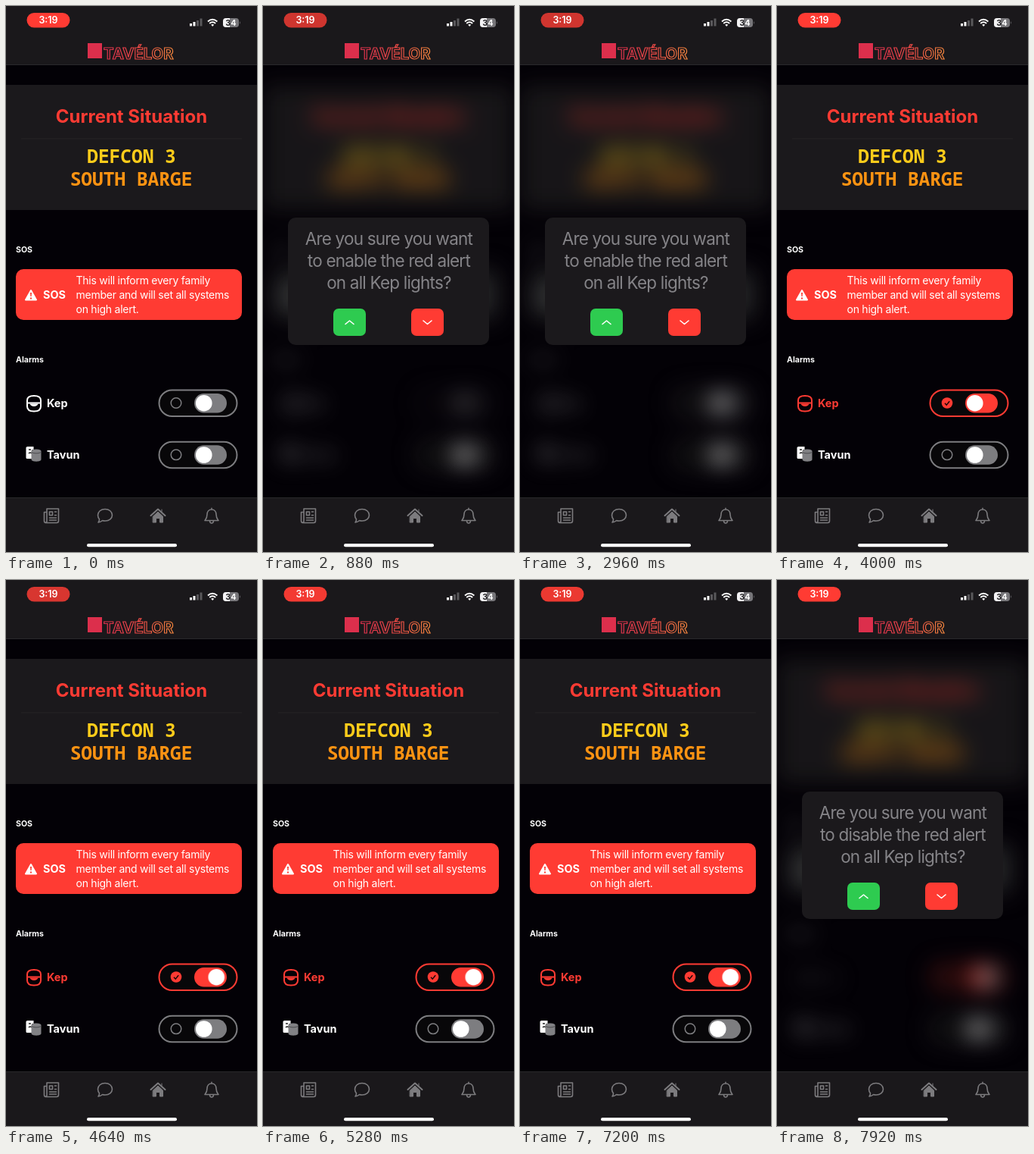
An HTML page that plays this animation: 332x720 px, repeating every 8000 ms.

```html
<!DOCTYPE html>
<html lang="en">
<head>
<meta charset="utf-8">
<title>Home alarms</title>
<style>
html, body { margin: 0; width: 100%; height: 100%; overflow: hidden; background: #030106; }
svg { display: block; width: 332px; height: 720px; }
text { font-family: Inter, Roboto, sans-serif; font-optical-sizing: none; fill: #fff; }
.b { font-weight: 700; }
.mid { text-anchor: middle; }
.mono { font: 700 24.5px "Noto Sans Mono", "DejaVu Sans Mono", monospace; text-anchor: middle; }
.small { font-size: 10.6px; }
.name { font-size: 14.5px; }
.note { font-size: 14px; letter-spacing: -.25px; }
.ask text { font-size: 22.5px; letter-spacing: -.8px; fill: #858488; text-anchor: middle; }
.line { fill: none; stroke: currentColor; stroke-width: 1.6; stroke-linecap: round; stroke-linejoin: round; }
.off { color: #7d7d80; }
.red { color: #ff3b33; }
.red text { fill: currentColor; }
.switch { --dim: .75; }

/* 1% of the 8 s loop is 80 ms */
.scene, .ask, .dim, .sos, .press, .knob, .accept, .before, .after { animation: 8s linear infinite; }
.scene { animation-name: blur; }
.ask { animation-name: show; }
.dim { animation-name: dim; }
.sos { fill: #ff3b33; animation-name: grey; }
.press { animation-name: press; }
.knob { animation-name: slide; }
.accept { animation-name: tap; }
.before { animation-name: before; }
.after { animation-name: after; }
.rec { animation: rec 2s ease-in-out infinite; }

@keyframes blur {
  0%, 5%, 49%, 93% { filter: blur(0) brightness(1); }
  9%, 45%, 97%, 100% { filter: blur(15px) brightness(.85); }
}
@keyframes show {
  0%, 5%, 49%, 93% { opacity: 0; }
  9%, 45%, 97%, 100% { opacity: 1; }
}
@keyframes dim {
  0%, 5%, 49%, 93% { opacity: 1; filter: grayscale(0); }
  9%, 45%, 97%, 100% { opacity: var(--dim, .6); filter: grayscale(1); }
}
@keyframes grey {
  0%, 5%, 49%, 93% { fill: #ff3b33; }
  9%, 45%, 97%, 100% { fill: #262628; }
}
@keyframes press {
  0%, 3% { opacity: 1; }
  6%, 11% { opacity: .28; }
  35%, 45% { opacity: .75; }
  49%, 91% { opacity: 1; }
  94%, 100% { opacity: .75; }
}
@keyframes slide {
  0%, 50.5% { transform: translateX(0); animation-timing-function: ease-in-out; }
  54%, 100% { transform: translateX(16.5px); }
}
@keyframes tap {
  0%, 40% { opacity: 1; }
  42%, 43% { opacity: .35; }
  45%, 100% { opacity: 1; }
}
@keyframes before {
  0%, 46.9% { visibility: visible; }
  47%, 100% { visibility: hidden; }
}
@keyframes after {
  0%, 46.9% { visibility: hidden; }
  47%, 100% { visibility: visible; }
}
@keyframes rec {
  0%, 100% { fill: #ff3b33; }
  46% { fill: #cf352f; }
  68% { fill: #f53a32; }
}
</style>
</head>
<body>
<svg viewBox="0 0 332 720">
  <defs>
    <linearGradient id="warm" gradientUnits="userSpaceOnUse" x1="107" y1="0" x2="226" y2="0">
      <stop offset="0" stop-color="#d92450"/>
      <stop offset=".6" stop-color="#ea4a45"/>
      <stop offset="1" stop-color="#f08a3c"/>
    </linearGradient>
    <linearGradient id="charge">
      <stop offset=".45" stop-color="#f4f3f5"/>
      <stop offset=".45" stop-color="#77767a"/>
    </linearGradient>
    <linearGradient id="digits">
      <stop offset=".48" stop-color="#222124"/>
      <stop offset=".48" stop-color="#fff"/>
    </linearGradient>
    <g id="frame">
      <rect x="202.5" y="506.5" width="103" height="34.5" rx="17.2" fill="#080709" stroke="currentColor" stroke-width="2"/>
      <rect x="249" y="511" width="43" height="25.5" rx="12.7" fill="currentColor"/>
    </g>
    <circle id="ring" cx="225" cy="523.5" r="6.8" fill="none" stroke="currentColor" stroke-width="1.5"/>
    <g id="lamp" fill="none" stroke="currentColor" stroke-width="2">
      <path d="M28 520c0-4 3-6 9-6s9 2 9 6v8c0 4-3 6.5-9 6.5s-9-2.5-9-6.5z"/>
      <path d="M28 523.5h18"/>
      <path d="M31.5 524.5c1 4.5 10 4.5 11 0z" fill="currentColor" stroke="none"/>
    </g>
  </defs>

  <rect width="332" height="720" fill="#030106"/>

  <g class="scene">
    <rect y="104" width="332" height="165" fill="#1b191c"/>
    <path d="M20 175h292" stroke="#262527"/>
    <text class="b mid" x="166" y="154" font-size="24" style="fill:#ff3b33">Current Situation</text>
    <text class="mono" x="166" y="207" style="fill:#ffcc1a">DEFCON 3</text>
    <text class="mono" x="165.5" y="237" style="fill:#ff9312">SOUTH BARGE</text>

    <g class="dim">
      <text class="b small" x="13" y="325">SOS</text>
      <text class="b small" x="13" y="470">Alarms</text>
    </g>

    <rect class="sos" x="13" y="347" width="299" height="67" rx="10"/>
    <g class="dim">
      <path d="M33 375l7 12.5h-14z" fill="#fff" stroke="#fff" stroke-width="2" stroke-linejoin="round"/>
      <path class="sos" d="M32 378h2l-.4 5h-1.2zM32 384.5h2v2h-2z"/>
      <text class="b" x="49" y="386.3" font-size="14.4">SOS</text>
      <text class="note" x="92.5" y="367">This will inform every family</text>
      <text class="note" x="92.5" y="386">member and will set all systems</text>
      <text class="note" x="92.5" y="405">on high alert.</text>
    </g>

    <g class="dim">
      <g class="before" color="#fff">
        <use href="#lamp"/>
        <text class="b name" x="54" y="529">Kep</text>
      </g>
      <g class="after red">
        <use href="#lamp"/>
        <text class="b name" x="54" y="529">Kep</text>
      </g>
      <path d="M28.5 581h8v4h-2v12h-6.5q-1.500 0-1.5-1.5v-13q0-1.500 2-1.5z" fill="#fff"/>
      <path d="M30 585h3M30 590q2-2 4 0" stroke="#222" stroke-width="1.5" fill="none"/>
      <path d="M33.5 587c0-3.500 13-3.500 13 0v11c0 3.500-13 3.500-13 0z" fill="#818184"/>
      <path d="M33.5 588c2 2.500 11 2.500 13 0" fill="none" stroke="#4b4b4e"/>
      <text class="b name" x="54" y="597">Tavun</text>
    </g>

    <g class="press">
      <g class="before off"><use href="#frame"/><use href="#ring"/></g>
      <g class="after red">
        <use href="#frame"/>
        <circle cx="225" cy="523.5" r="7.3" fill="currentColor"/>
        <path d="M222 523.8l2.2 2.4 4-5" fill="none" stroke="#160506" stroke-width="1.4"/>
      </g>
      <circle class="knob" cx="261.8" cy="523.7" r="10.8" fill="#fff"/>
    </g>
    <g class="dim switch off">
      <g transform="translate(0 68.3)">
        <use href="#frame"/><use href="#ring"/>
        <circle cx="261.8" cy="523.7" r="10.8" fill="#fff"/>
      </g>
    </g>
  </g>

  <g class="ask">
    <rect x="33" y="279" width="266" height="168" rx="10" fill="#1b191c"/>
    <text x="166.4" y="315">Are you sure you want</text>
    <text class="before" x="166.4" y="344">to enable the red alert</text>
    <text class="after" x="166.4" y="344">to disable the red alert</text>
    <text x="166.4" y="373">on all Kep lights?</text>
    <g class="accept">
      <rect x="93" y="399" width="43" height="36" rx="7" fill="#2ecb50"/>
      <path class="line" color="#fff" d="M109 419.5l5.5-4.5 5.5 4.5"/>
    </g>
    <rect x="196" y="399" width="43" height="36" rx="7" fill="#ff3b33"/>
    <path class="line" color="#fff" d="M212 415l5.5 4.5 5.5-4.5"/>
  </g>

  <!-- header -->
  <rect width="332" height="78" fill="#1a181b"/>
  <path d="M0 77.5h332" stroke="#29282b"/>
  <rect class="rec" x="27.5" y="9" width="57" height="19.5" rx="9.7"/>
  <text class="mid" x="56" y="23.3" font-size="12.5" font-weight="600">3:19</text>
  <path d="M243 23h3v3.5h-3zM247.5 21h3v5.5h-3z" fill="#fff"/>
  <path d="M252 19h3v7.5h-3zM256.5 16.5h3v10h-3z" fill="#59585b"/>
  <g fill="none" stroke="#fff" stroke-width="1.9">
    <path d="M267 20.5q6-5.4 12.4 0M269.2 23q4-3.3 8 0"/>
    <path d="M273.2 27l-2-2.3q2-1.4 4 0z" fill="#fff" stroke="none"/>
  </g>
  <rect x="287" y="16" width="21" height="12" rx="3.8" fill="url(#charge)"/>
  <path d="M309 20q1.8 2 0 4z" fill="#77767a"/>
  <text class="b mid" x="297.5" y="26" font-size="10.8" style="fill:url(#digits)">34</text>
  <rect x="108" y="49" width="19" height="20" fill="#dc2f4c"/>
  <text class="b" x="129" y="69.5" font-size="20.3" style="fill:none;stroke:url(#warm);stroke-width:1.2">TAVÉLOR</text>

  <!-- tab bar -->
  <rect y="648" width="332" height="72" fill="#1a181b"/>
  <path d="M0 648.5h332" stroke="#29282b"/>
  <g class="line" color="#7c7b7e">
    <path d="M54 663h15.5v16q0 2.500-2.5 2.500h-14q-2.500 0-2.5-2.500v-11.5h3.5v11.5M54 663v16q0 2.500-2 2.500"/>
    <path d="M57.5 667h4v4.5h-4zM64.5 667h2M64.5 671.5h2M57.5 675h9M57.5 678h9"/>
    <path d="M131 663.5c5.5 0 9.5 3.4 9.5 7.8s-4 7.7-9.5 7.7q-1.8 0-3.4-.5-2.3 2.2-5.6 2.5 1.6-1.8 1.5-4.2c-1.3-1.5-2-3.3-2-5.5 0-4.4 4-7.8 9.5-7.8z"/>
    <path d="M191.5 672l9.5-8.5 9.5 8.5" stroke-width="2"/>
    <path d="M194.5 673l6.5-6 6.5 6v8h-4v-5.5h-5v5.500h-4zM206 664v3" fill="currentColor" stroke-width="1"/>
    <path d="M272 664c-4 0-6 3-6 6.500 0 4.500-1.500 6-3 8h18c-1.500-2-3-3.500-3-8 0-3.500-2-6.500-6-6.500zM272 664v-1.800M269.500 679c.3 4 4.700 4 5 0"/>
  </g>
  <rect x="107" y="709" width="119" height="4.3" rx="2.1" fill="#fff"/>
</svg>
</body>
</html>
```
